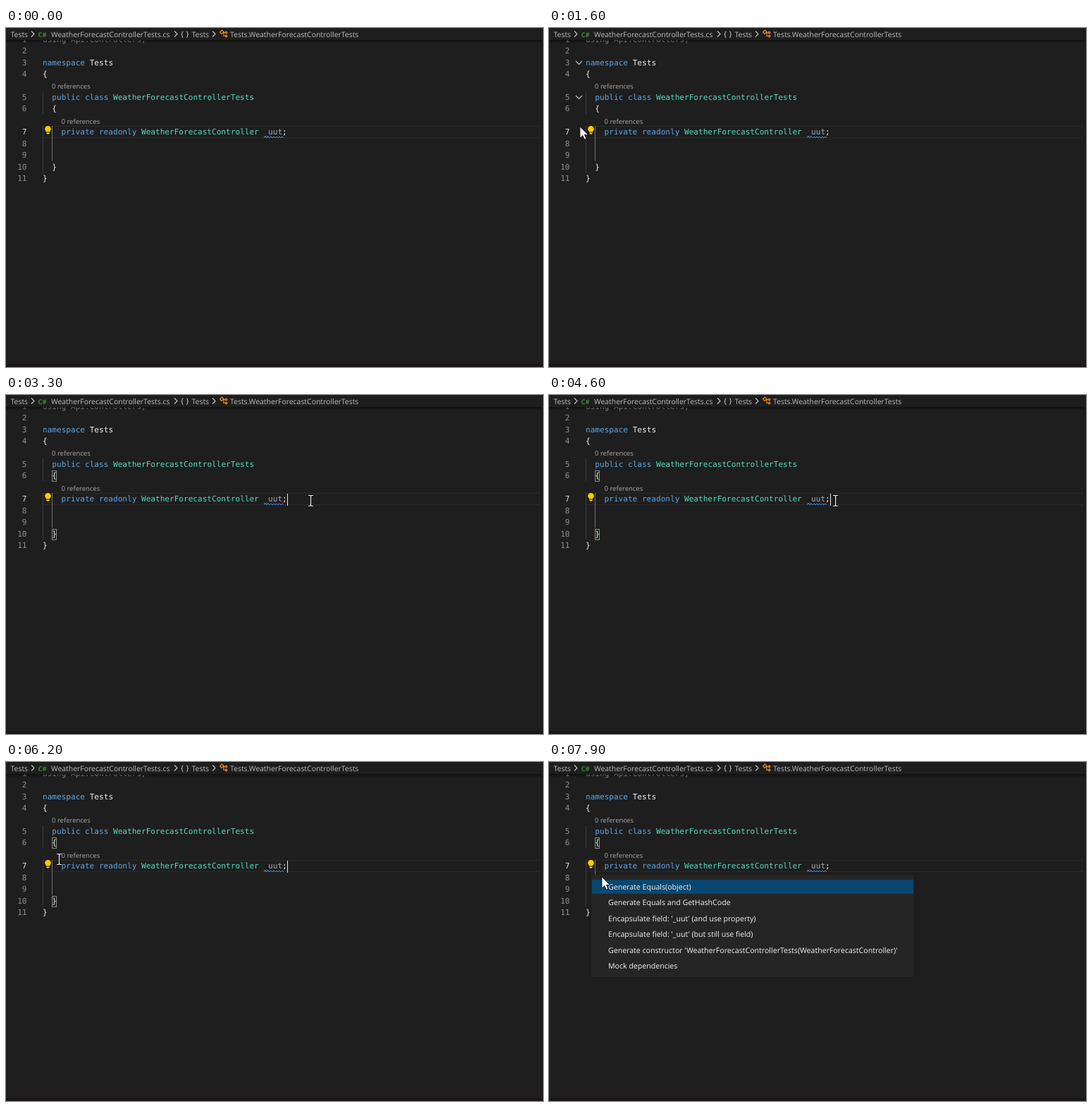
An HTML page for the animation above (8000 ms loop, 762x481 px).

```html
<!DOCTYPE html>
<html lang="en">
<head>
<meta charset="utf-8">
<title>Code editor quick fix</title>
<style>
  html, body { margin: 0; width: 100%; height: 100%; overflow: hidden; background: #1e1e1e; }
  svg { display: block; width: 762px; height: 481px; }
  text { font: 10.45px "Open Sans", "Noto Sans", sans-serif; text-rendering: geometricPrecision; fill: #bdbdbd; }
  .code text { font: 11.08px "DejaVu Sans Mono", monospace; fill: #eee; }
  .k { fill: #5ba6e8; }
  .c { fill: #52dcc0; }
  #nums text { fill: #8f8f8f; text-anchor: end; }
  #nums .now { fill: #e0e0e0; }
  .lens { font-size: 9.5px; fill: #a8a8a8; }
  #menu text { font-size: 10.6px; fill: #f4f4f4; }
  .line { fill: none; stroke: #c8c8c8; stroke-width: 1.1; }
  .box { fill: #00640020; stroke: #888; }
</style>
</head>
<body>
<svg viewBox="0 0 762 481">
  <defs>
    <linearGradient id="fade" x2="0" y2="1">
      <stop stop-color="#000" stop-opacity=".5"/>
      <stop offset="1" stop-color="#000" stop-opacity="0"/>
    </linearGradient>
    <filter id="blur"><feGaussianBlur stdDeviation="2"/></filter>
  </defs>

  <path d="M52 139.5H757M52 155.5H757" stroke="#2a2a2a"/>
  <path d="M52.5 90V122M52.5 139V205" stroke="#3c3c3c"/>
  <path d="M65.5 139V188.5" stroke="#707070"/>
  <g id="brackets">
    <rect class="box" x="65.5" y="107.5" width="6" height="15"/>
    <rect class="box" x="65.5" y="190.5" width="6" height="15"/>
  </g>

  <g class="code">
    <g id="nums"></g>
    <text x="52" y="19.500" opacity=".6">using Api.Controllers;</text>
    <text x="52" y="53"><tspan class="k">namespace</tspan> Tests</text>
    <text x="52" y="69">{</text>
    <text x="65.3" y="102"><tspan class="k">public class</tspan> <tspan class="c">WeatherForecastControllerTests</tspan></text>
    <text x="65.3" y="118">{</text>
    <text x="78.6" y="151"><tspan class="k">private readonly</tspan> <tspan class="c">WeatherForecastController</tspan> <tspan fill="#a8a8a8">_uut</tspan>;</text>
    <text x="65.3" y="201">}</text>
    <text x="52" y="217">}</text>
  </g>
  <text class="lens" x="65" y="86">0 references</text>
  <text class="lens" x="78.5" y="136">0 references</text>
  <path id="squiggle" fill="none" stroke="#3794ff"/>
  <path id="folds" class="line" d="M38 47l4.500 4.500 4.500-4.500M38 96l4.500 4.500 4.500-4.500"/>

  <g fill="#fc0">
    <path d="M57.300 147.500Q55.200 145.500 55.200 143.300A4.300 4.300 0 0 1 63.800 143.300Q63.800 145.500 61.700 147.500Z"/>
    <path d="M57.300 148.500h4.400v1.200q-2.200 2-4.400 0z"/>
  </g>
  <path id="caret" d="M399.500 140V157" stroke="#e8e8e8"/>

  <path d="M0 0H762V17H0Z" fill="#1e1e1e"/>
  <path d="M0 17H762V22H0Z" fill="url(#fade)"/>
  <text id="crumb" x="6.500" y="13">Tests</text>
  <text x="45.500" y="12.500" style="font-weight:700;font-size:9.500px;fill:#388a34">C#</text>
  <text x="64" y="13">WeatherForecastControllerTests.cs</text>
  <text x="248" y="12" style="fill:#d8d8d8">{</text>
  <text x="255.500" y="12" style="fill:#d8d8d8">}</text>
  <text x="263.500" y="13">Tests</text>
  <text x="318" y="13">Tests.WeatherForecastControllerTests</text>
  <path class="line" d="M36 4.500l4 4-4 4M239 4.500l4 4-4 4M293 4.500l4 4-4 4"/>
  <path d="M303.500 6l3-3 2.500 2.500-3 3zM308 6.500h3M309 6.500v5h2M311 6.500l1.500-1.500 1.500 1.500-1.500 1.500zM311 11.500l1.500-1.500 1.500 1.500-1.500 1.500z" fill="none" stroke="#ee8d28" stroke-width="1.200"/>

  <path d="M760 17H762V477H760Z" fill="#191919"/>
  <path d="M0 477H762V481H0Z" fill="#1a1517"/>

  <g id="menu">
    <rect x="60" y="161" width="458" height="144" fill="#000" opacity=".25" filter="url(#blur)"/>
    <rect x="60" y="160" width="458" height="145" fill="#252526"/>
    <rect x="61" y="167" width="456" height="20" fill="#094771"/>
  </g>

  <g id="mouse">
    <path id="arrow" d="M0 0V16L3.800 12.500 6.300 18 8.800 17 6.400 11.500H11.500Z" fill="#fff" stroke="#000" stroke-width=".7"/>
    <g id="beam" fill="none">
      <path d="M-3.500-7.500H3.500M0-7.500V7.500M-3.500 7.500H3.500" stroke="#000" stroke-width="2.600"/>
      <path d="M-3.500-7.500H-1L0-6.500 1-7.500H3.500M0-7V7M-3.500 7.500H-1L0 6.500 1 7.500H3.500" stroke="#fff" stroke-width="1.200"/>
    </g>
    <path id="hand" d="M-2 2Q0-1 2 2V8Q4 6.500 5 9Q7 7.500 8 10Q10 9 9.500 13V17L8 19V23H-1V20L-6 14Q-7.500 11 -4.500 11L-2 13.500Z" fill="#fff" stroke="#000" stroke-width=".8"/>
  </g>
</svg>
<script>
const $ = id => document.getElementById(id);
const show = (id, on) => $(id).style.display = on ? '' : 'none';

function addText(parent, x, y, str, cls = '') {
  const el = document.createElementNS('http://www.w3.org/2000/svg', 'text');
  el.setAttribute('x', x);
  el.setAttribute('y', y);
  el.setAttribute('class', cls);
  el.textContent = str;
  $(parent).append(el);
}

[19.5, 36, 53, 69, 102, 118, 151, 168, 184, 201, 217]
  .forEach((y, i) => addText('nums', 29.5, y, i + 1, i === 6 ? 'now' : ''));

["Generate Equals(object)",
 "Generate Equals and GetHashCode",
 "Encapsulate field: '_uut' (and use property)",
 "Encapsulate field: '_uut' (but still use field)",
 "Generate constructor 'WeatherForecastControllerTests(WeatherForecastController)'",
 "Mock dependencies"].forEach((s, i) => addText('menu', 84, 181 + i * 22.4, s));

$('squiggle').setAttribute('d', 'M366 156' + 'l2-2 2 2'.repeat(7));

// Pointer path: time, x, y, shape
const path = [
  [1200, 20, 5, 'arrow'], [1300, 30, 40, 'arrow'], [1400, 37, 85, 'arrow'],
  [1500, 42, 122, 'arrow'], [1600, 44, 140, 'arrow'], [1700, 52, 152, 'arrow'],
  [1800, 82, 163, 'beam'], [1900, 125, 166, 'beam'], [2000, 183, 156, 'beam'],
  [2100, 295, 130, 'beam'], [2200, 388, 116, 'beam'], [2300, 388, 116, 'beam'],
  [2400, 402, 110, 'beam'], [2700, 430, 118, 'beam'], [3000, 438, 138, 'beam'],
  [3200, 432.5, 150, 'beam'], [4400, 432.5, 150, 'beam'], [5200, 329, 150, 'beam'],
  [5300, 329, 150, 'beam'], [5400, 315, 150, 'beam'], [6200, 75.5, 138, 'beam'],
  [6400, 70, 143, 'beam'], [6500, 70, 143, 'beam'], [6600, 68, 148, 'hand'],
  [6700, 67, 146, 'hand'], [6800, 67, 146, 'hand'], [6900, 65, 146, 'hand'],
  [7000, 65, 146, 'hand'], [7100, 64, 145.5, 'hand'], [7200, 62, 146, 'arrow'],
  [7600, 62, 146, 'arrow'], [7900, 75, 163, 'arrow']
];

const between = (t, a, b) => t >= a && t < b;

function draw(now) {
  const t = Math.floor(now % 8000 / 100) * 100; // the picture steps at 10 fps
  const i = path.findLastIndex(p => p[0] <= t);
  show('mouse', i >= 0);
  if (i >= 0) {
    const a = path[i], b = path[i + 1] || a;
    const u = b === a ? 0 : (t - a[0]) / (b[0] - a[0]);
    const mix = k => a[k] + (b[k] - a[k]) * u;
    $('mouse').setAttribute('transform', `translate(${mix(1)} ${mix(2)})`);
    for (const s of ['arrow', 'beam', 'hand']) show(s, s === a[3]);
  }
  $('crumb').style.fill = t === 1200 ? '#e8e8e8' : '';
  show('folds', between(t, 1400, 1800));
  show('brackets', t >= 3300);
  show('caret', between(t, 3200, 3800) || (between(t, 4200, 7200) && (t - 4200) % 1000 < 500));
  show('menu', t >= 7200);
}

const start = performance.now();
function tick() {
  draw(performance.now() - start);
  requestAnimationFrame(tick);
}
tick();
</script>
</body>
</html>
```
